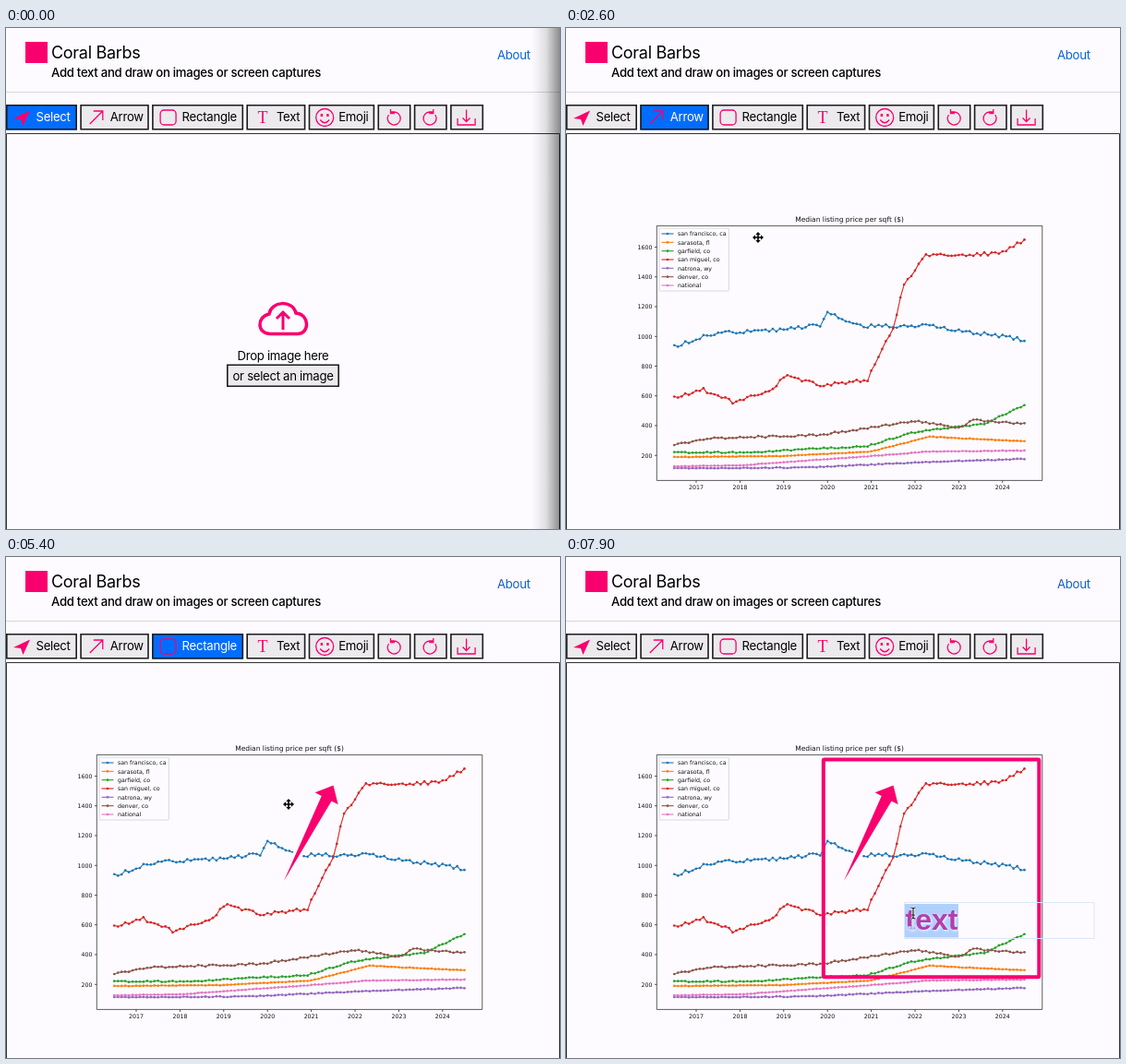
Animation of 600 by 543 pixels, one loop 8 s. Source, as an HTML page with a canvas:

```html
<!DOCTYPE html>
<html lang="en">
<head>
<meta charset="utf-8">
<title>Image annotation demo</title>
<style>
html, body { margin: 0; width: 100%; height: 100%; overflow: hidden; background: #fdfbff; }
canvas { display: block; }
</style>
</head>
<body>
<canvas id="stage" width="600" height="543"></canvas>
<script>
const ctx = document.getElementById('stage').getContext('2d');
const LOOP = 8000, STEP = 100;
const BG = '#fdfbff', PINK = '#f9006f', BLUE = '#006dff', GRIP = '#a9c9f3';
const UI = '13.2px Inter, sans-serif';
const PLOT = 'px "DejaVu Sans", sans-serif';

// ---- drawing helpers ----

function text(s, x, y, font, color = '#000', align = 'left') {
  ctx.font = font;
  ctx.letterSpacing = font.includes('Inter') ? '-0.3px' : '0px';
  ctx.fillStyle = color;
  ctx.textAlign = align;
  ctx.fillText(s, x, y);
}

function stroke(d, color = PINK, width = 1.3) {
  ctx.strokeStyle = color;
  ctx.lineWidth = width;
  ctx.stroke(new Path2D(d));
}

function fill(d, color = PINK) {
  ctx.fillStyle = color;
  ctx.fill(new Path2D(d));
}

function box(x, y, w, h, color) {
  ctx.fillStyle = color;
  ctx.fillRect(x, y, w, h);
}

function frame(x, y, w, h, color, width = 1, radius = 0) {
  ctx.strokeStyle = color;
  ctx.lineWidth = width;
  ctx.beginPath();
  ctx.roundRect(x, y, w, h, radius);
  ctx.stroke();
}

function at(x, y, paint) {
  ctx.save();
  ctx.translate(x, y);
  paint();
  ctx.restore();
}

// ---- page ----

const undo = () => stroke('M-5.5 -3 A7 7 0 1 0 0 -6 H-4 M-3.5 -9 V-4.5 H1');
const redo = () => { ctx.scale(-1, 1); undo(); };

function face() {
  stroke('M9.5 0 A9.5 9.5 0 1 1 -9.5 0 A9.5 9.5 0 1 1 9.5 0 M-5 2.5 Q0 9 5 2.5');
  fill('M-4.5 -4 h2.4 v3 h-2.4 Z M2 -4 h2.4 v3 h-2.4 Z');
}

// Width, label, icon drawn around its centre
const BUTTONS = [
  [77, 'Select', () => fill('M8.5 -7.5 L-9.5 1 L-1.5 2 L1 9 Z')],
  [74.5, 'Arrow', () => stroke('M-7 7 L7 -7 M-3 -7 H7 V3')],
  [99, 'Rectangle', () => frame(-8.5, -8, 17, 16, PINK, 1.3, 4)],
  [64, 'Text', () => text('T', 0, 6, '18px "Liberation Serif", serif', PINK, 'center')],
  [71.5, 'Emoji', face],
  [36, '', undo],
  [36, '', redo],
  [36, '', () => stroke('M-9.5 1 V8 H9.5 V1 M0 -8.5 V4 M-4 .5 L0 4.5 L4 .5')]
];

function button(x, y, w, h, active) {
  box(x, y, w, h, active ? BLUE : '#eceaed');
  frame(x + 0.8, y + 0.8, w - 1.6, h - 1.6, '#1c1c1e', 1.6);
}

function page(active) {
  box(0, 0, 600, 543, BG);
  box(21, 15, 24, 23, PINK);
  text('Coral Barbs', 49, 33, '18px Inter, sans-serif');
  text('Add text and draw on images or screen captures', 49, 53, '500 ' + UI);
  text('About', 532, 34, UI, '#0b62d0');
  box(0, 69, 600, 1, '#d8d6da');
  let x = 0;
  BUTTONS.forEach(([w, label, icon], i) => {
    button(x, 83, w, 27.6, i === active);
    at(x + 17.5, 97, icon);
    text(label, x + 32.5, 100.8, UI, i === active ? '#fff' : '#000');
    x += w + 3.3;
  });
  frame(0.5, 114.5, 599, 440, '#333');
}

function dropZone() {
  stroke('M286 331.5 C272 331.5 271 313 285 310 C287 296 310 294 314 309 C329 310 329 331.5 316 331.5 Z', PINK, 3.5);
  stroke('M300 327 V309 M293 315 L300 308 L307 315', PINK, 3);
  text('Drop image here', 300, 359.5, UI, '#000', 'center');
  button(239, 364.5, 122, 24.5, false);
  text('or select an image', 300, 381.5, UI, '#000', 'center');
  const g = ctx.createLinearGradient(570, 0, 600, 0);
  g.addColorStop(0, 'rgba(0,0,0,0)');
  g.addColorStop(0.5, 'rgba(0,0,0,.12)');
  g.addColorStop(1, 'rgba(0,0,0,.45)');
  box(570, 0, 30, 543, g);
}

// ---- chart ----

// Label, colour, wobble, then a few turning points as [month, y]
const SERIES = [
  ['san francisco, ca', '#1f77b4', 2, [[0, 345], [10, 332], [18, 329], [30, 327], [40, 322], [42, 309], [52, 323], [70, 323], [96, 338]]],
  ['sarasota, fl', '#ff7f0e', 0.3, [[0, 465], [30, 464], [54, 459], [70, 443], [96, 448]]],
  ['garfield, co', '#2ca02c', 0.8, [[0, 460], [20, 460], [53, 453], [66, 438], [85, 429], [96, 409]]],
  ['san miguel, co', '#d62728', 2, [[0, 400], [8, 392], [16, 405], [27, 392], [30, 377], [40, 387], [53, 381], [60, 325], [63, 278], [69, 247], [90, 244], [96, 229]]],
  ['natrona, wy', '#9467bd', 0.5, [[0, 477], [36, 476.5], [66, 471], [96, 467]]],
  ['denver, co', '#8c564b', 1, [[0, 452], [9, 445], [40, 441], [66, 426], [78, 433], [82, 425], [96, 429]]],
  ['national', '#e377c2', 0.3, [[0, 475], [18, 474], [54, 464], [70, 459], [96, 458]]]
];

function random(seed) {
  return () => {
    seed = (seed * 16807) % 2147483647;
    return seed / 2147483647;
  };
}

function sample(keys, wobble, seed) {
  const rnd = random(seed);
  const points = [];
  for (let i = 0, k = 0; i <= 96; i++) {
    if (i > keys[k + 1][0]) k++;
    const [[a, ya], [b, yb]] = keys.slice(k, k + 2);
    const y = ya + (yb - ya) * (i - a) / (b - a);
    points.push([117.3 + i * 3.95, y + (rnd() * 2 - 1) * wobble]);
  }
  return points;
}

const LINES = SERIES.map(([, , wobble, keys], i) => sample(keys, wobble, 7919 * (i + 3)));

function dot(x, y, color) {
  ctx.fillStyle = color;
  ctx.beginPath();
  ctx.arc(x, y, 1.35, 0, 7);
  ctx.fill();
}

function chart() {
  const small = 6.25 + PLOT;
  text('Median listing price per sqft ($)', 307, 210, 7.5 + PLOT, '#111', 'center');
  LINES.forEach((points, i) => {
    const color = SERIES[i][1];
    stroke('M' + points.join('L'), color, 1.1);
    points.forEach(([x, y]) => dot(x, y, color));
  });
  frame(98.3, 214.4, 417.5, 276, '#333', 0.8);
  for (let v = 200; v <= 1600; v += 200) {
    const y = 463.2 - (v - 200) * 0.1612;
    box(96, y - 0.4, 2.5, 0.8, '#333');
    text(v, 93.5, y + 2.3, small, '#111', 'right');
  }
  for (let n = 0; n < 8; n++) {
    const x = 141 + n * 47.4;
    box(x - 0.4, 490.5, 0.8, 2.5, '#333');
    text(2017 + n, x, 500, small, '#111', 'center');
  }
  frame(101, 217, 75.5, 68, '#d2d0d4', 0.8, 1.5);
  SERIES.forEach(([label, color], i) => {
    const y = 223 + i * 9.33;
    box(103.5, y - 0.55, 13, 1.1, color);
    dot(110, y, color);
    text(label, 121, y + 2.2, small, '#111');
  });
}

// ---- annotations ----

function selection() {
  const grip = (x, y) => frame(x - 5, y - 5, 10.5, 10.5, GRIP);
  frame(30.5, 170.5, 539, 359.5, GRIP);
  stroke('M300 138.5 V170.5', GRIP, 1);
  grip(300, 138.5);
  for (const i of [-1, 0, 1])
    for (const j of [-1, 0, 1])
      if (i || j) grip(300 + i * 269.5, 350.5 + j * 179.5);
}

function arrow([x0, y0], [x1, y1]) {
  const len = Math.hypot(x1 - x0, y1 - y0);
  const h = Math.min(16, len * 0.6), wing = h * 0.88, neck = h * 0.38;
  at(x1, y1, () => {
    ctx.rotate(Math.atan2(y1 - y0, x1 - x0));
    const d = `M${-len} 0 L${-h} ${-neck} V${-wing} L0 0 L${-h} ${wing} V${neck} Z`;
    ctx.lineJoin = 'round';
    stroke(d, BG, 7);
    fill(d);
    ctx.lineJoin = 'miter';
  });
}

function marquee([x, y]) {
  frame(278.8, 219.5, Math.max(0, x - 277.5), Math.max(0, y - 220.2), PINK, 4, 1);
}

function textBox() {
  frame(366.5, 374.5, 205.5, 39, '#dce6f6');
  box(367, 376, 58, 36.5, '#b0d0fc');
  ctx.save();
  ctx.shadowColor = '#fff';
  ctx.shadowBlur = 3;
  ctx.shadowOffsetX = ctx.shadowOffsetY = 1;
  text('text', 367.5, 404, 'bold 32px "Liberation Sans", sans-serif', '#b23fae');
  ctx.restore();
  ctx.strokeStyle = '#c4d6fb';
  ctx.lineWidth = 0.9;
  ctx.strokeText('text', 367.5, 404);
}

// ---- pointer ----

const TAIL = [299, 356];

// Start, end, goal; the pointer rests in between
const MOVES = [
  [1300, 1900, [283, 286]],
  [2100, 2400, [117, 98]],
  [2500, 2800, TAIL],
  [2800, 3600, [351, 258]],
  [4000, 4700, [205, 98]],
  [4800, 5400, [306, 268]],
  [5400, 5600, [279, 220]],
  [5600, 6200, [511, 456]],
  [6300, 6700, [292, 98]],
  [6800, 7200, [376, 386]]
];

function pointerAt(t) {
  let p = [230, 231];
  for (const [start, end, goal] of MOVES) {
    if (t <= start) break;
    const e = Math.sin(Math.min(1, (t - start) / (end - start)) * Math.PI / 2);
    p = p.map((v, i) => v + (goal[i] - v) * e);
  }
  return p;
}

const SHAPES = {
  plain: 'M0 0 V11.5 L2.7 9 L4.6 13.5 L6.6 12.6 L4.7 8.3 H8.2 Z',
  move: 'M0 -6 L2.7 -3 H.8 V-.8 H3 V-2.7 L6 0 L3 2.7 V.8 H.8 V3 H2.7 L0 6 L-2.7 3 H-.8 V.8 H-3 V2.7 L-6 0 L-3 -2.7 V-.8 H-.8 V-3 H-2.7 Z',
  beam: 'M-2.5 -6 Q0 -6 0 -4.5 Q0 -6 2.5 -6 M0 -4.5 V4.5 M-2.5 6 Q0 6 0 4.5 Q0 6 2.5 6 M-1.5 2 H1.5'
};

function pointer(t, [x, y]) {
  const kind = t >= 7100 ? 'beam' : t > 1300 && y > 170 ? 'move' : 'plain';
  at(x, y, () => {
    stroke(SHAPES[kind], '#fff', 2.4);
    if (kind === 'beam') stroke(SHAPES.beam, '#111', 1.1);
    else fill(SHAPES[kind], '#000');
  });
}

// ---- timeline ----

function toolAt(t) {
  if (t >= 7100) return -1;
  if (t >= 6800) return 3;
  if (t >= 4800 && t < 6300) return 2;
  return t >= 2500 && t < 3800 ? 1 : 0;
}

function draw(t) {
  page(toolAt(t));
  if (t < 1000) return dropZone();
  const p = pointerAt(t);
  const drawing = t > 2800 && t < 3800, framing = t > 5600 && t < 6300;
  chart();
  if (drawing) arrow(TAIL, p);
  if (t >= 3800) arrow([301, 351], [354.5, 247.5]);
  if (t > 5600) marquee(framing ? p : [511, 456]);
  if (drawing || framing) selection();
  if (t >= 7100) textBox();
  pointer(t, p);
}

const start = performance.now();
function tick() {
  const t = (performance.now() - start) % LOOP;
  draw(Math.floor(t / STEP) * STEP);
  requestAnimationFrame(tick);
}
tick();
</script>
</body>
</html>
```
